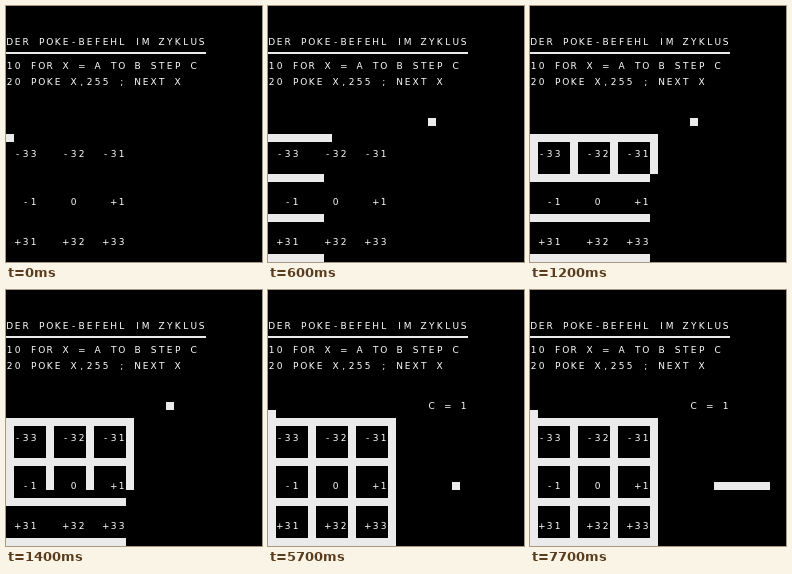
An HTML page with a canvas for the animation above (8 s loop, 256x256 px).

```html
<!DOCTYPE html>
<html lang="de">
<meta charset="utf-8">
<title>POKE im Zyklus</title>
<style>
html, body { margin: 0; width: 100%; height: 100%; overflow: hidden; background: #000; }
canvas { display: block; }
</style>
<canvas id="screen" width="256" height="256"></canvas>
<script>
const ctx = document.getElementById('screen').getContext('2d');
const CELL = 8, LOOP = 8000, TICK = 100;
const INK = '#ebebeb';

// Text and its place: column and row on the 32 x 32 grid
const LINES = [
  ['DER POKE-BEFEHL IM ZYKLUS', 0, 4],
  ['10 FOR X = A TO B STEP C', 0, 7],
  ['20 POKE X,255 ; NEXT X', 0, 9],
  ['-33', 1, 18], ['-32', 7, 18], ['-31', 12, 18],
  ['-1', 2, 24], ['0', 8, 24], ['+1', 13, 24],
  ['+31', 1, 29], ['+32', 7, 29], ['+33', 12, 29]
];

// Cells poked so far: [time, count]
const PACE = [[0, 1], [400, 12], [800, 47], [1200, 80], [1700, 124]];

function print(text, col, row) {
  [...text].forEach((ch, i) =>
    ctx.fillText(ch, (col + i) * CELL + 3.7, row * CELL + 7));
}

function poke(col, row) {
  ctx.fillRect(col * CELL, row * CELL, CELL, CELL);
}

function poked(t) {
  for (let i = 1; i < PACE.length; i++) {
    const [t0, n0] = PACE[i - 1], [t1, n1] = PACE[i];
    if (t < t1) return Math.floor(n0 + (n1 - n0) * (t - t0) / (t1 - t0));
  }
  return PACE[PACE.length - 1][1];
}

// Four horizontal bars grow side by side, then four vertical ones
function grid(count) {
  for (let n = 0; n < count; n++) {
    const line = n % 4 * 5;
    if (n < 60) poke(n >> 2, 16 + line);
    else poke(line, 16 + (n - 60 >> 2));
  }
}

function draw(t) {
  ctx.fillStyle = '#000';
  ctx.fillRect(0, 0, 256, 256);
  ctx.fillStyle = INK;
  ctx.fillRect(0, 46, 200, 2);
  grid(poked(t));

  if (t >= 1700) poke(0, 15);
  else if (t >= 100) poke(20, 14);

  // One more cell every third of a second
  for (let i = 0; i < 7; i++) {
    if (t >= 5700 + Math.round(i * 10 / 3) * TICK) poke(23 + i, 24);
  }

  ctx.fillStyle = '#fff';
  ctx.font = '9px "DejaVu Sans", sans-serif';
  ctx.textAlign = 'center';
  LINES.forEach(line => print(...line));
  if (t >= 1700) print('C = 1', 20, 14);
}

const start = performance.now();
function frame() {
  const t = (performance.now() - start) % LOOP;
  draw(Math.floor(t / TICK) * TICK);
  requestAnimationFrame(frame);
}
frame();
</script>
</html>
```
